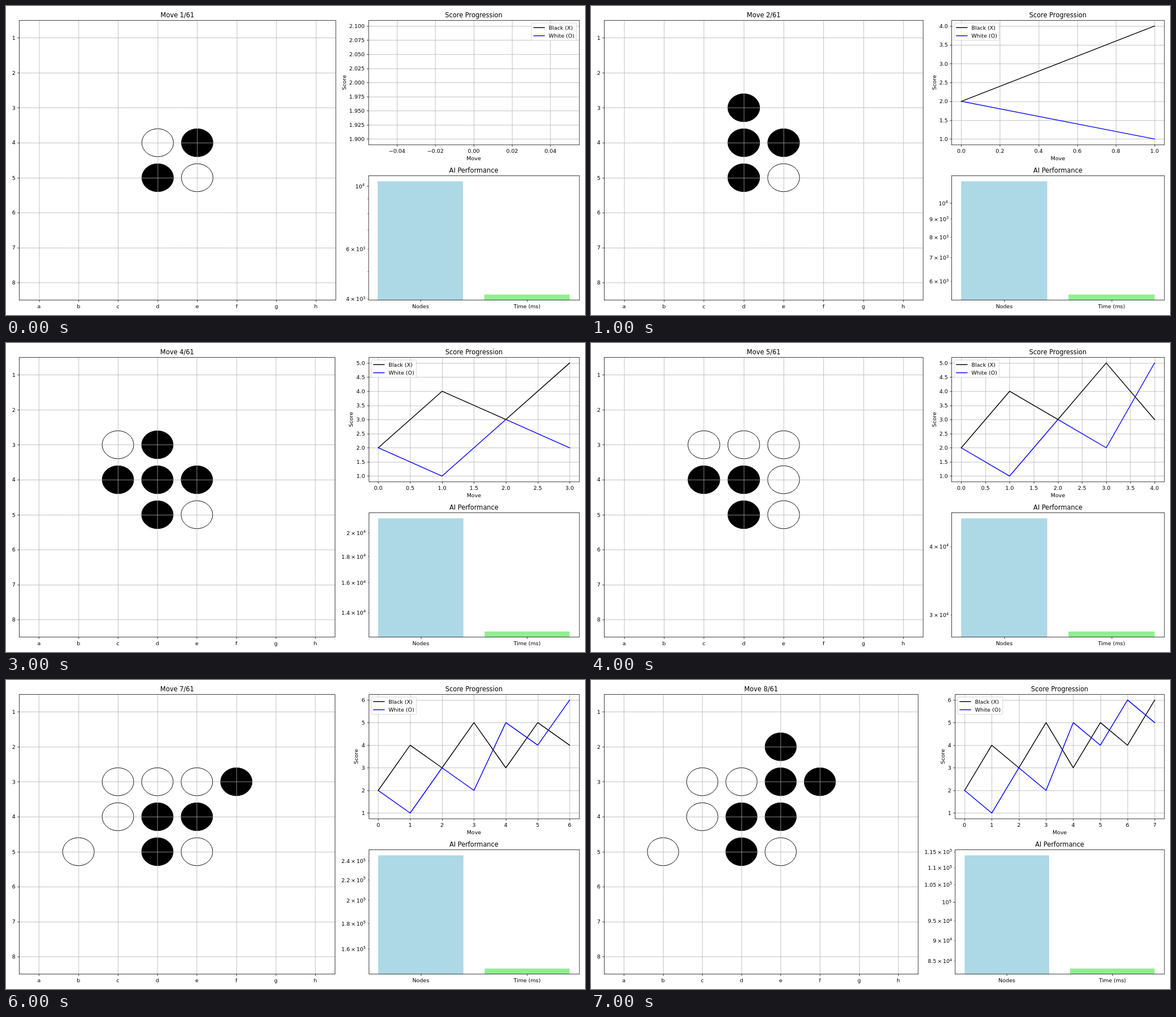
These frames come from a looping animation (1025x547 px, 8000 ms). An HTML page with a canvas:

```html
<!DOCTYPE html>
<html lang="en">
<head>
<meta charset="utf-8">
<title>Board game replay</title>
<style>
html, body { margin: 0; width: 100%; height: 100%; overflow: hidden; background: #fff; }
canvas { display: block; }
</style>
</head>
<body>
<canvas id="stage" width="1025" height="547"></canvas>
<script>
const ctx = document.getElementById('stage').getContext('2d');
// The figure is laid out on a 1500 x 800 sheet and scaled down to the stage.
const WIDTH = 1500, HEIGHT = 800;
ctx.scale(1025 / WIDTH, 547 / HEIGHT);

const EM = 13.89, TITLE = 16.67, GRID = '#b0b0b0';
const THIN = 1.11, SERIES = 2.08, TICK = 4.86, MINOR_TICK = 2.78;
const LEFT = 34.3, RIGHT = 1485, TOP = 37.1, BOTTOM = 761.4;
const SCORE_BOTTOM = 359.1, BAR_TOP = 439.4;
const BLACK = 1, WHITE = 2;

// Per step: left edge of the charts, score tick steps, bar values, log ticks (first, step, last)
const steps = [
  { left: 938.6, dx: .02, dy: .025, nodes: 10373, time: 4149, ticks: [4e3, 1e3, 1e4], hidden: [5, 7, 8, 9] },
  { left: 934.2, dx: .2, dy: .5, nodes: 11500, time: 5500, ticks: [6e3, 1e3, 1e4] },
  { left: 934.2, dx: .25, dy: .5, nodes: 15926, time: 7309, ticks: [8e3, 1e3, 1e4] },
  { left: 939.6, dx: .5, dy: .5, nodes: 21333, time: 12863, ticks: [14e3, 2e3, 2e4] },
  { left: 934.2, dx: .5, dy: .5, nodes: 45000, time: 28000, ticks: [3e4, 1e4, 4e4] },
  { left: 934.2, dx: 1, dy: .5, nodes: 60060, time: 40000, ticks: [4e4, 1e4, 6e4] },
  { left: 939.6, dx: 1, dy: 1, nodes: 246000, time: 146090, ticks: [16e4, 2e4, 24e4] },
  { left: 943.2, dx: 1, dy: 1, nodes: 113840, time: 83220, ticks: [85e3, 5e3, 115e3] }
];

// Play the game once, keeping each position and score.
const cell = name => [name.charCodeAt(0) - 97, name[1] - 1];
const key = (x, y) => x + ',' + y;
let discs = new Map();
for (const [name, side] of [['d4', WHITE], ['e5', WHITE], ['e4', BLACK], ['d5', BLACK]]) {
  discs.set(key(...cell(name)), side);
}
const boards = [discs];
['d3', 'c3', 'c4', 'e3', 'f3', 'b5', 'e2'].forEach((name, i) => {
  const side = i % 2 ? WHITE : BLACK, [x, y] = cell(name);
  discs = new Map(discs);
  for (let dx = -1; dx <= 1; dx++) for (let dy = -1; dy <= 1; dy++) {
    const run = [];
    let n = 1;
    while (discs.get(key(x + n * dx, y + n * dy)) === 3 - side) {
      run.push(key(x + n * dx, y + n * dy));
      n++;
    }
    if (discs.get(key(x + n * dx, y + n * dy)) === side) run.forEach(k => discs.set(k, side));
  }
  discs.set(key(x, y), side);
  boards.push(discs);
});
const scores = side => boards.map(b => [...b.values()].filter(v => v === side).length);
const blackScores = scores(BLACK), whiteScores = scores(WHITE);

const snap = v => Math.round(v) + .5;

function text(str, x, y, align = 'center', size = EM) {
  ctx.font = `${size}px "DejaVu Sans", sans-serif`;
  ctx.textAlign = align;
  ctx.fillStyle = '#000';
  ctx.fillText(str, x, Math.round(y));
  return ctx.measureText(str).width;
}

function path(points, color = '#000', width = THIN) {
  ctx.beginPath();
  points.forEach(p => ctx.lineTo(...p));
  ctx.strokeStyle = color;
  ctx.lineWidth = width;
  ctx.lineJoin = 'round';
  ctx.lineCap = width === SERIES ? 'square' : 'butt';
  ctx.stroke();
}

const gridX = (x, y0, y1) => path([[snap(x), y0], [snap(x), y1]], GRID);
const gridY = (y, x0, x1) => path([[x0, snap(y)], [x1, snap(y)]], GRID);

function frame(x0, y0, x1, y1, title) {
  ctx.strokeStyle = '#000';
  ctx.lineWidth = THIN;
  ctx.lineJoin = 'miter';
  ctx.strokeRect(snap(x0), snap(y0), snap(x1) - snap(x0), snap(y1) - snap(y0));
  text(title, (x0 + x1) / 2, y0 - 8.33, 'center', TITLE);
}

function xTick(x, bottom, label) {
  path([[snap(x), snap(bottom)], [snap(x), snap(bottom) + TICK]]);
  text(label, x, bottom + 20.7);
}

function yTick(left, y, label) {
  path([[snap(left) - TICK, snap(y)], [snap(left), snap(y)]]);
  return text(label, left - 2 * TICK, y + 5.2, 'right');
}

function drawBoard(i) {
  const right = LEFT + 1.5 * (RIGHT - steps[i].left);
  const w = (right - LEFT) / 8, h = (BOTTOM - TOP) / 8;
  const px = c => LEFT + (c + .5) * w, py = r => TOP + (r + .5) * h;
  for (const [k, side] of boards[i]) {
    const [c, r] = k.split(',').map(Number);
    ctx.beginPath();
    ctx.ellipse(px(c), py(r), .4 * w, .4 * h, 0, 0, 2 * Math.PI);
    ctx.fillStyle = side === BLACK ? '#000' : '#fff';
    ctx.fill();
    ctx.strokeStyle = '#000';
    ctx.lineWidth = 1.39;
    ctx.stroke();
  }
  for (let n = 0; n < 8; n++) {
    gridX(px(n), TOP, BOTTOM);
    gridY(py(n), LEFT, right);
  }
  for (let n = 0; n < 8; n++) {
    xTick(px(n), BOTTOM, 'abcdefgh'[n]);
    yTick(LEFT, py(n), String(n + 1));
  }
  frame(LEFT, TOP, right, BOTTOM, `Move ${i + 1}/61`);
}

function tickValues(lo, hi, step) {
  const pad = (hi - lo) * .05, digits = (String(step).split('.')[1] || '').length, list = [];
  for (let k = Math.ceil((lo - pad) / step); k * step <= hi + pad; k++) {
    list.push([k * step, (k * step).toFixed(digits).replace('-', '\u2212')]);
  }
  return list;
}

function drawLegend(x) {
  ctx.beginPath();
  ctx.roundRect(x, TOP + .5 * EM, 116.5, 45, .2 * EM);
  ctx.fillStyle = 'rgba(255,255,255,.8)';
  ctx.fill();
  ctx.strokeStyle = 'rgba(204,204,204,.8)';
  ctx.lineWidth = 1.39;
  ctx.stroke();
  [['Black (X)', '#000'], ['White (O)', '#00f']].forEach(([label, color], n) => {
    const y = 61 + n * 20.5, lineY = Math.round(y - .35 * EM);
    path([[x + .4 * EM, lineY], [x + 2.4 * EM, lineY]], color, SERIES);
    text(label, x + 3.2 * EM, y, 'left');
  });
}

function drawScores(i) {
  const { left, dx, dy } = steps[i], margin = (RIGHT - left) / 22, height = SCORE_BOTTOM - TOP;
  const black = blackScores.slice(0, i + 1), white = whiteScores.slice(0, i + 1);
  const [xLo, xHi] = i ? [0, i] : [-.05, .05];
  const [yLo, yHi] = i ? [Math.min(...white), Math.max(...black, ...white)] : [1.9, 2.1];
  const px = v => left + margin + (v - xLo) / (xHi - xLo) * (RIGHT - left - 2 * margin);
  const py = v => SCORE_BOTTOM - height / 22 - (v - yLo) / (yHi - yLo) * height / 1.1;
  const xs = tickValues(xLo, xHi, dx), ys = tickValues(yLo, yHi, dy);

  xs.forEach(([v]) => gridX(px(v), TOP, SCORE_BOTTOM));
  ys.forEach(([v]) => gridY(py(v), left, RIGHT));
  if (i) {
    path(black.map((v, n) => [px(n), py(v)]), '#000', SERIES);
    path(white.map((v, n) => [px(n), py(v)]), '#00f', SERIES);
  }
  xs.forEach(([v, label]) => xTick(px(v), SCORE_BOTTOM, label));
  let labelWidth = 0;
  ys.forEach(([v, label]) => { labelWidth = yTick(left, py(v), label); });
  frame(left, TOP, RIGHT, SCORE_BOTTOM, 'Score Progression');
  text('Move', (left + RIGHT) / 2, SCORE_BOTTOM + 40);
  ctx.save();
  ctx.translate(Math.round(left - labelWidth - 18.3), (TOP + SCORE_BOTTOM) / 2);
  ctx.rotate(-Math.PI / 2);
  text('Score', 0, 0);
  ctx.restore();
  drawLegend(i === 0 || i === 2 ? RIGHT - .5 * EM - 116.5 : left + .5 * EM);
}

function powerLabel(mantissa, exponent, x, y) {
  const gap = .2 * EM;
  x -= text(exponent, x, y - 5.3, 'right', EM * .7);
  x -= text('10', x, y, 'right');
  if (mantissa === 1) return;
  x -= text('\u00d7', x - gap, y, 'right') + 2 * gap;
  text(mantissa, x, y, 'right');
}

function drawBars(i) {
  const { left, nodes, time, ticks: [first, step, last], hidden = [] } = steps[i];
  const margin = (RIGHT - left) / 22, x0 = left + margin, unit = (RIGHT - left - 2 * margin) / 1.8;
  const height = BOTTOM - BAR_TOP;
  const py = v => BAR_TOP + height / 22 + Math.log(nodes / v) / Math.log(nodes / time) * height / 1.1;
  [['Nodes', '#add8e6', nodes], ['Time (ms)', '#90ee90', time]].forEach(([label, color, value], n) => {
    const x = Math.round(x0 + n * unit), y = Math.round(py(value));
    ctx.fillStyle = color;
    ctx.fillRect(x, y, Math.round(x0 + (n + .8) * unit) - x, BOTTOM - y);
    xTick(x0 + (n + .4) * unit, BOTTOM, label);
  });
  for (let v = first; v <= last; v += step) {
    const exponent = String(v).length - 1, mantissa = v / 10 ** exponent;
    const major = mantissa === 1, length = major ? TICK : MINOR_TICK, y = py(v);
    path([[snap(left) - length, snap(y)], [snap(left), snap(y)]], '#000', major ? THIN : .83);
    if (!hidden.includes(mantissa)) powerLabel(mantissa, exponent, left - length - TICK, y + 6);
  }
  frame(left, BAR_TOP, RIGHT, BOTTOM, 'AI Performance');
}

function draw() {
  const i = Math.floor(performance.now() / 1000) % steps.length;
  ctx.fillStyle = '#fff';
  ctx.fillRect(0, 0, WIDTH, HEIGHT);
  drawBoard(i);
  drawScores(i);
  drawBars(i);
  requestAnimationFrame(draw);
}
draw();
</script>
</body>
</html>
```
